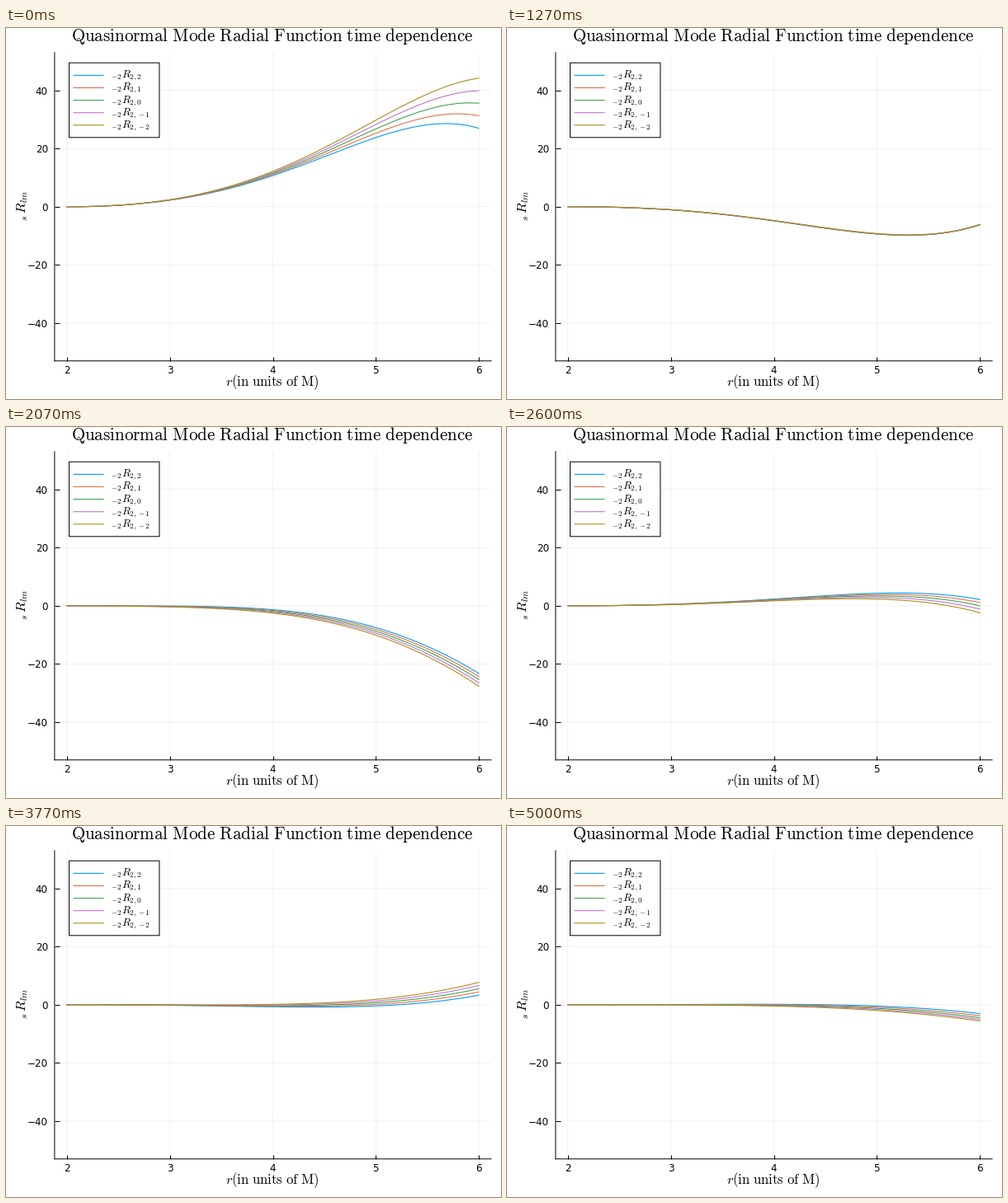
A matplotlib script that plays this animation: 600x450 px, repeating every 5.03 s.

```python
import numpy as np
import matplotlib.pyplot as plt
from matplotlib.animation import FuncAnimation
from matplotlib.patches import Rectangle

W, H, DPI = 600, 450, 100
PX = 72 / DPI                      # points per pixel
STEPS, LOOP_MS, T_END = 151, 5030, 30.0
FRAMES = 2 * STEPS
SPIN, S, DEPTH = 0.1, -2, 150
MODES = [2, 1, 0, -1, -2]
COLORS = ["#009AFA", "#E36F47", "#3EA44E", "#C371D2", "#AC8E18"]

plt.rcParams.update({
    "font.family": "DejaVu Sans",
    "mathtext.fontset": "cm",
    "axes.linewidth": PX,
    "path.snap": False,
})


# Kerr quasinormal modes by continued fraction, in units where 2M = 1
A = SPIN / 2
B = np.sqrt(1 - SPIN**2)
R_IN, R_OUT = (1 - B) / 2, (1 + B) / 2


def ratios(w, m):
    """Residual of the continued fraction and the series ratios d[n+1]/d[n]."""
    c = A * w
    lam = 4 - 4 * c * m / 3 - (1 - 25 * (9 - m * m) / 472.5) * c * c
    k = w / 2 - A * m
    c0 = 1 - S - 1j * w - 2j * k / B
    c1 = -4 + 2j * w * (2 + B) + 4j * k / B
    c2 = S + 3 - 3j * w - 2j * k / B
    c3 = (w * w * (4 + 2 * B - A * A) - 2 * A * m * w - S - 1
          + (2 + B) * 1j * w - lam + (4 * w + 2j) * k / B)
    c4 = S + 1 - 2 * w * w - (2 * S + 3) * 1j * w - (4 * w + 2j) * k / B
    n = np.arange(DEPTH)
    al = n * n + (c0 + 1) * n + c0
    be = -2 * n * n + (c1 + 2) * n + c3
    ga = n * n + (c2 - 3) * n + c4 - c2 + 2
    q, out = 0.9, []
    for i in range(DEPTH - 1, 0, -1):
        q = -ga[i] / (be[i] + al[i] * q)
        out.append(q)
    return be[0] + al[0] * q, np.array(out[::-1])


def frequency(m):
    w = 2 * (0.3737 + 0.0063 * m - 0.089j)
    for _ in range(12):
        f = ratios(w, m)[0]
        slope = (ratios(w + 1e-6, m)[0] - f) / 1e-6
        w -= f / slope
    return w


def radial(r, w, m):
    d = np.concatenate(([1], np.cumprod(ratios(w, m)[1])))
    p, q = r / 2 - R_OUT, r / 2 - R_IN
    sig = (w * R_OUT - A * m) / B
    series = np.polyval(d[::-1], p / q)
    return (np.exp(0.5j * w * r) * q ** (-1 - S + 1j * w + 1j * sig)
            * p ** (-S - 1j * sig) * series)


r = np.linspace(2, 6, 41)
waves = []
for m in MODES:
    w = frequency(m)
    shape = radial(r, w, m)
    edge = 35.6 + 74j - m * (4.3 + 0.75j)
    waves.append((w, shape * edge / shape[-1]))


# Stage
fig = plt.figure(figsize=(W / DPI, H / DPI), dpi=DPI, facecolor="white")
left, right, top, bottom = 58.9, 588.1, 29.8, 403.8
ax = fig.add_axes([left / W, 1 - bottom / H, (right - left) / W, (bottom - top) / H])
ax.set(xlim=(1.88, 6.12), ylim=(-53, 53),
       xticks=range(2, 7), yticks=range(-40, 41, 20))
ax.spines[["top", "right"]].set_visible(False)
ax.set_axisbelow(True)
ax.grid(color="black", alpha=0.1, lw=0.5 * PX)
ax.tick_params(direction="in", length=5.5 * PX, width=PX, labelsize=11.9 * PX)
ax.tick_params(axis="x", pad=5.5 * PX)
ax.tick_params(axis="y", pad=8 * PX)


def label(x, y, text, size, **kw):
    kw.setdefault("ha", "left")
    fig.text(x / W, 1 - y / H, text, fontsize=size * PX, va="baseline", **kw)


def roman(text):
    return r"\mathrm{" + text.replace(" ", r"\ ") + "}"


label(323, 16.5, f"${roman('Quasinormal Mode Radial Function time dependence')}$",
      21, ha="center")
label(322.5, 434, f"$r{roman('(in units of M)')}$", 16.6, ha="center")
label(24.3, 215, r"${}_s\,R_{lm}$", 16.6, ha="center",
      rotation=90, rotation_mode="anchor")


# Curves and legend
curves = [ax.plot([], [], color=c, lw=1.1 * PX, zorder=3)[0] for c in COLORS]

key = fig.add_axes([0, 0, 1, 1])
key.set(xlim=(0, W), ylim=(H, 0))
key.axis("off")
key.add_patch(Rectangle((76.5, 42.2), 109.4, 90.6, fc="white", ec="black", lw=PX))
for i, (m, c) in enumerate(zip(MODES, COLORS)):
    y = 57.4 + 15.1 * i
    key.plot([82, 118], [y, y], color=c, lw=1.1 * PX)
    label(126.6, y + 3, f"${{}}_{{-2}}R_{{2,{m}}}$", 13)


def update(i):
    step = min((i + 1) // 2, STEPS - 1)
    t = T_END * step / (STEPS - 1)
    for line, (w, amp) in zip(curves, waves):
        line.set_data(r, (amp * np.exp(-0.5j * w * t)).real)
    return curves


anim = FuncAnimation(fig, update, frames=FRAMES, interval=LOOP_MS / FRAMES,
                     init_func=lambda: curves, repeat=True, repeat_delay=0)
plt.show()
```
